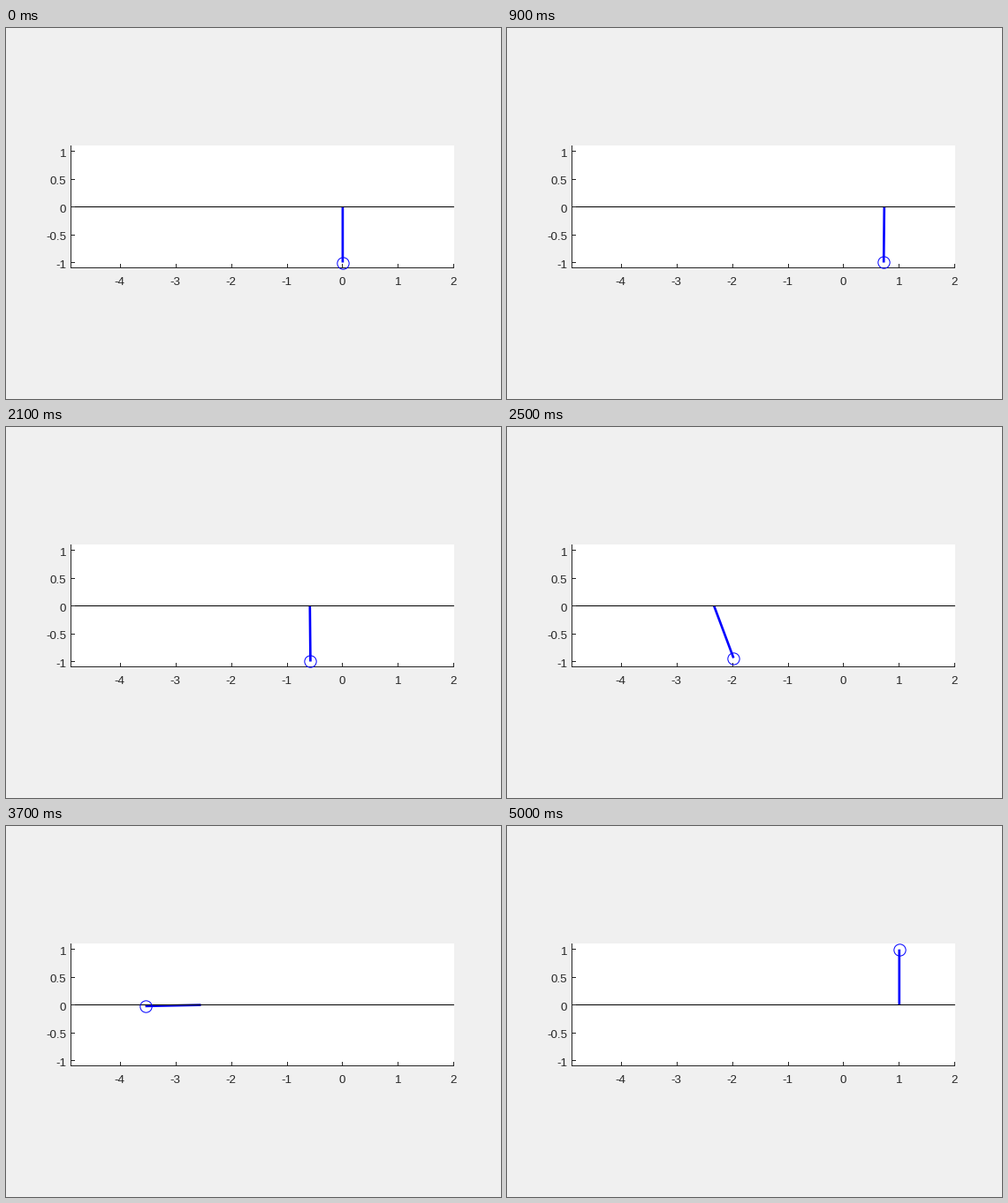
A matplotlib script that plays this animation: 560x420 px, repeating every 5100 ms.

```python
import math

import matplotlib.pyplot as plt
import numpy as np
from matplotlib.animation import FuncAnimation
from matplotlib.patches import Rectangle

WIDTH, HEIGHT, DPI = 560, 420, 100
PX = 72 / DPI                      # points per pixel
FRAMES, INTERVAL = 51, 100
SCALE, X0, Y0 = 62.9, 380.9, 202.6
LEFT, RIGHT, TOP, BOTTOM = 73, 507, 133, 272
INK = "#262626"

# Key poses of the swing-up: seconds, cart position, angle from hanging
TIMES = np.array([0, .6, .9, 1.2, 1.8, 2.1, 2.4, 2.9, 3.3, 3.7, 4.2, 4.5, 5])
CART = np.array([0, .74, .73, .18, -.16, -.59, -1.86, -3.73, -3.75, -2.55,
                 -.15, .4, 1])
ANGLE = np.array([0, -.5, -.01, .98, .34, .01, .29, -.07, -1.43, -1.55,
                  .55, 2, math.pi])


def spline(knots, values, t):
    """Cubic spline that starts and ends at rest."""
    n = len(knots)
    h = np.diff(knots)
    rate = np.diff(values) / h
    a, b = np.eye(n), np.zeros(n)
    for i in range(1, n - 1):
        a[i, i - 1:i + 2] = h[i], 2 * (h[i - 1] + h[i]), h[i - 1]
        b[i] = 3 * (h[i] * rate[i - 1] + h[i - 1] * rate[i])
    slope = np.linalg.solve(a, b)
    k = np.clip(np.searchsorted(knots, t, side="right") - 1, 0, n - 2)
    s = (t - knots[k]) / h[k]
    return (values[k] * (1 + 2 * s) * (1 - s) ** 2
            + values[k + 1] * s ** 2 * (3 - 2 * s)
            + h[k] * s * (1 - s) * (slope[k] * (1 - s) - slope[k + 1] * s))


clock = np.arange(FRAMES) * INTERVAL / 1000
cart = spline(TIMES, CART, clock)
angle = spline(TIMES, ANGLE, clock)

fig = plt.figure(figsize=(WIDTH / DPI, HEIGHT / DPI), dpi=DPI,
                 facecolor="#f0f0f0")
ax = fig.add_axes([0, 0, 1, 1])
ax.set_xlim(0, WIDTH)
ax.set_ylim(HEIGHT, 0)
ax.axis("off")


def rule(x, y, color=INK, z=4):
    ax.plot(x, y, color=color, lw=PX, solid_capstyle="butt", snap=False,
            zorder=z)


def label(x, y, value, align):
    ax.text(x, y, f"{value:g}", ha=align, va="baseline", color=INK,
            family="Liberation Sans", size=13.33 * PX)


def center(v):
    """Middle of the pixel that holds v."""
    return math.floor(v) + 0.5


ax.add_patch(Rectangle((LEFT, TOP), RIGHT - LEFT, BOTTOM - TOP,
                       fc="white", ec="none", zorder=0))
rule([LEFT + 0.5] * 2, [TOP, BOTTOM])
rule([LEFT, RIGHT], [BOTTOM - 0.5] * 2)

for value in range(-4, 3):
    x = X0 + SCALE * value
    rule([center(x)] * 2, [BOTTOM - 5, BOTTOM])
    label(x - 0.5, 291, value, "center")

for value in np.arange(-1, 1.5, 0.5):
    y = Y0 - SCALE * value
    rule([LEFT, LEFT + 5], [center(y)] * 2)
    label(68, y + 6, value, "right")

rule([LEFT, RIGHT], [center(Y0)] * 2, "black", 3)
pole, = ax.plot([], [], color="blue", lw=2.67 * PX, solid_capstyle="butt",
                snap=False, zorder=2)
bob, = ax.plot([], [], "o", mfc="none", mec="blue", ms=13.3 * PX, mew=PX,
               snap=False, zorder=5)


def draw(frame):
    x = X0 + SCALE * cart[frame]
    bob_x = x + SCALE * math.sin(angle[frame])
    bob_y = Y0 + SCALE * math.cos(angle[frame])
    pole.set_data([x, bob_x], [Y0, bob_y])
    bob.set_data([bob_x], [bob_y])
    return pole, bob


anim = FuncAnimation(fig, draw, frames=FRAMES, interval=INTERVAL, repeat=True,
                     repeat_delay=0, blit=False)
plt.show()
```
